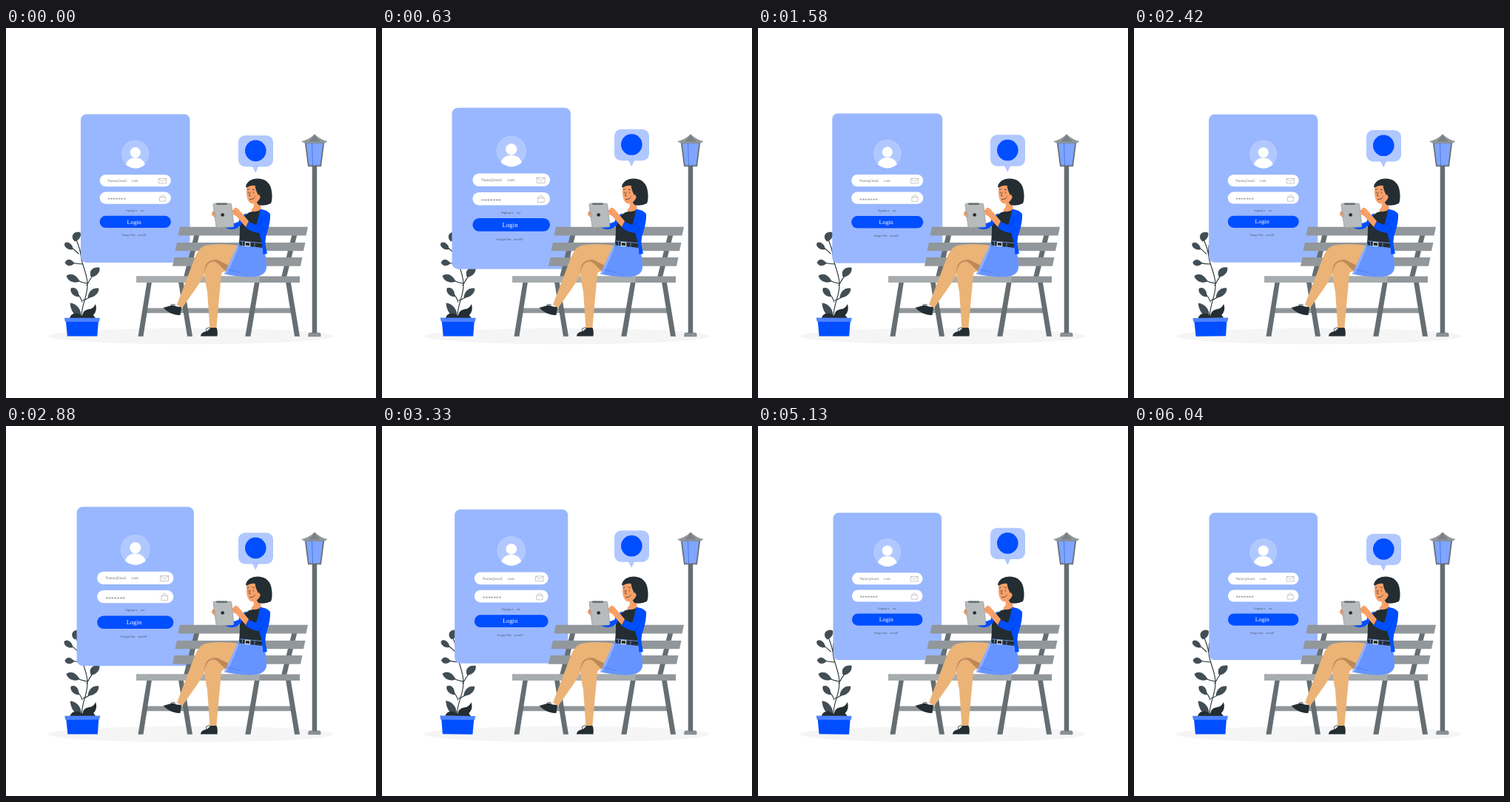
These frames come from a looping animation (500x500 px, 6080 ms). An HTML page:

```html
<!DOCTYPE html>
<html lang="en">
<head>
<meta charset="utf-8">
<title>Login on a bench</title>
<style>
html, body { margin: 0; width: 100%; height: 100%; overflow: hidden; background: #fff; }
svg { display: block; width: 100vw; height: 100vh; }
text { font-family: "Liberation Serif", "Times New Roman", serif; text-rendering: geometricPrecision; }
.small { font-size: 4.2px; fill: #4a5868; }
.blue { fill: #004eff; }
.pale { fill: #b1c8ff; }
.dark { fill: #232d32; }
.steel { fill: #666e72; }
.slat { fill: #91979a; }
.skin { fill: #f8a069; }
.leg { fill: #ebb376; }
.line { fill: none; stroke: #263238; stroke-width: .8; stroke-linecap: round; }
.icon { fill: none; stroke: #a6a6a6; stroke-width: .6; }
</style>
</head>
<body>
<svg viewBox="0 0 500 500">
  <ellipse cx="249.5" cy="416.5" rx="193.5" ry="10.8" fill="#f5f5f5"/>

  <g id="plant">
    <path class="line" style="stroke-width:1.1" d="M102 391C102 372 111 362 110 345C109 329 102 320 101 307C100 298 98 294 94 284M101 307L101.500 294M104 319Q96 319 89 317M109 348Q113 340 119 332M109 345Q101 344 93 339M103 370Q101 363 94 357M104 368Q112 366 118 359M98 305Q92 299 86 295"/>
    <g fill="#424e55" stroke="#2b363c" stroke-width=".7">
      <path d="M93 288C89 285 89 279 93 277C96 275.500 100.500 276 100.500 277.500C101 282 98 287 93 288Z"/>
      <path d="M90 299C83 300 78 295 79.500 291C83 288 90 292 90 299Z"/>
      <path d="M92 318C88 322 82 322 80 317C82 312 88 312 92 318Z"/>
      <path d="M115 336C112 328 117 323 126 324C127 330 122 336 115 336Z"/>
      <path d="M99 342C94 345 84 343 82 335C88 331 95 334 99 342Z"/>
      <path d="M98 363C91 362 87 358 88 352C94 350 98 354 98 363Z"/>
      <path d="M111 364C112 356 117 351 125 352C125 359 119 364 111 364Z"/>
      <path d="M101 391C93 390 88 382 87 372C96 373 102 381 101 391Z"/>
    </g>
    <path class="dark" d="M86 392Q89 384 98 386Q101 388 103 389Q104 381 112 380Q118 380 121 373Q124 382 118 388L121 392Z"/>
    <path class="blue" d="M81 396H125L123.5 416.5H83Z"/>
    <path fill="#4d83ff" d="M79 391.7H127L126 397H80Z"/>
  </g>

  <g id="panel">
    <rect x="101.5" y="117.2" width="146.5" height="199" rx="7.5" fill="#99b7ff"/>
    <circle class="pale" cx="174.8" cy="170.5" r="19.3" stroke="#86a9ff" stroke-width=".5"/>
    <circle cx="174.8" cy="168.5" r="7" fill="#fff"/>
    <path d="M162 185C164.500 172.500 185 172.500 187.600 185Q175 195 162 185Z" fill="#fff"/>
    <g fill="#fff">
      <rect x="127" y="198.300" width="95.500" height="16" rx="8"/>
      <rect x="127" y="221.500" width="95.500" height="16" rx="8"/>
    </g>
    <rect class="blue" x="127" y="253.500" width="95.500" height="16.200" rx="8.100"/>
    <path class="icon" d="M206.200 203.500H216.200V210H206.200ZL211.200 207.500L216.200 203.500"/>
    <path class="icon" d="M207.300 228.500H215.300V234H207.300ZM208.900 228.500V227.500Q211.300 223.500 213.700 227.500V228.500"/>
    <text x="137.500" y="208" font-size="5" fill="#777">Name@mail.<tspan x="170">com</tspan></text>
    <text x="137.500" y="234.300" font-size="7" fill="#777">*******</text>
    <text class="small" x="162.200" y="247.700">Signup n<tspan x="181.400">ow</tspan></text>
    <text x="173.200" y="264.200" font-size="8" fill="#fff" text-anchor="middle">Login</text>
    <text class="small" x="156.700" y="280.800">Forgot Pas<tspan x="177.800">sword?</tspan></text>
  </g>

  <g id="bench">
    <path class="steel" d="M254.500 279H261.500L247 337H240ZM386.500 279H393.500L379 337H372Z"/>
    <path class="slat" d="M190 378.500H388V385.200H190Z"/>
    <path class="steel" d="M190.500 343H197L185.500 416.700H178.500ZM233 343H239.700L252 416.700H245ZM336 343H342.700L330.500 416.700H323.300ZM378 343H384.700L397 416.700H390Z"/>
    <path class="slat" d="M235 268.800H408L405.500 280.500H232.500ZM231 290H404.500L402 301.300H228.500ZM227.500 310H400.500L398 321.700H225ZM176.300 335.500H397V344H176.300Z"/>
    <path fill="#a7acae" d="M176.300 335.500H342.500V344H176.300Z"/>
  </g>

  <g id="lamp">
    <path class="steel" d="M413.700 186H420.200V413H413.700Z"/>
    <path fill="#8c9295" stroke="#666e72" stroke-width=".6" d="M408.700 416.700V414Q409 412 411 412H423Q425 412 425 414V416.700Z"/>
    <path fill="#7fa5ff" stroke="#666e72" stroke-width="1.700" d="M404.700 155H429.300L425.200 186.300H408.800Z"/>
    <path fill="none" stroke="#3f6ee0" stroke-width=".8" d="M413.500 155L414.500 186"/>
    <path fill="#92989b" d="M399 153Q409 151 417 143.500Q425 151 434.500 153L431 155.500H403Z"/>
    <path fill="#7c8387" d="M417 143.500Q420 149 425 153.500H409Q414 149 417 143.500Z"/>
  </g>

  <g id="bubble">
    <rect class="pale" x="314" y="145.700" width="47" height="42.300" rx="9"/>
    <path class="pale" d="M333 187H341L337.300 195.500Z" stroke="#9bb9ff" stroke-width=".4"/>
    <circle class="blue" cx="337.300" cy="166.400" r="14.300"/>
  </g>

  <g id="woman">
    <path class="leg" d="M318 322L299 329C291 328 291 332 290.500 338L284.200 407H275.500L272 356C269 342 267 330 269 322C272 312 284 309 300 316Z"/>
    <path class="leg" d="M314 294C302 292 276 291 267 295C261 298 257 305 253 316L231 374L238.500 378C247 365 264 343 268 333C267 318 275 312 286 313.500L303 325Z"/>
    <path fill="#bd8958" d="M268 333C267 318 275 312 286 313.500L303 322L299 329C291 326 287 315 280 315.500C273 316 269 323 268 333Z"/>
    <path class="dark" d="M212.500 378L225 374.500Q231 377 237 377L235.500 388Q225 388 217 382ZM263 415.800Q264 411 272 409.500L277 405H284.500Q286.500 410 285.500 416.500H263Z"/>
    <path class="line" d="M223 376Q223 372 226 374Q229 372 228 376M271 410Q269 404 273 406Q275 402 276 407"/>
    <path fill="#6694ff" d="M314 292L347 295C351 305 352.500 315 352 325C350 333 343 336.500 330 336.500Q311 336 295 332.500Z"/>
    <path fill="#8fb0ff" d="M313.500 292L295 332.500L297.500 333Q303 324 314 297Z"/>
    <path fill="none" stroke="#3b70f0" stroke-width=".6" d="M299 326L316 330.500"/>

    <path class="dark" d="M329 249L346 245L349 292L315 291Q317 266 315 258Z"/>
    <path class="dark" d="M316 287.500L347 290.500L346.500 297L315.500 293.500Z"/>
    <path fill="none" stroke="#8fb0ff" stroke-width=".7" d="M316 287.800L347 290.800M319.500 288V293.800M336 290V295.500"/>
    <path fill="none" stroke="#fff" stroke-width="1" d="M323.500 289.300L330 290L329.400 295L323 294.300Z"/>
    <path class="blue" d="M325 250Q318 253 314 262L302 266L295 269Q302 274 311 271L317 267Z"/>
    <path class="skin" d="M334 232H343L345 245Q338 250 331 247L335 241Z"/>
    <path class="blue" d="M343 245Q352 245 357 251Q357.500 262 353 276Q348 287 353 305L347.500 306Q347 292 342 277Q334 277 324 270L328 262L338 266Q341 259 343 245Z"/>
    <path fill="none" stroke="#003bc2" stroke-width=".7" d="M346 256Q345 264 341 268M341 277Q346 274 348 269"/>

    <path class="dark" d="M324 214C326 206 334 203 341 203.500C352 204 358 211 359 221Q360.500 231 358 237Q350 241 341 239L332 225Z"/>
    <path class="skin" d="M326 213Q324 222 326 230Q328 237 333 237.500Q339 237 342 232Q345 228 342.500 226L337 211Z"/>
    <path class="dark" d="M324.500 216Q330 206 338 207Q347 214 345 227Q342.500 223 341 226Q338 221 336.500 213Q331 212 324.500 216Z"/>
    <path class="line" style="stroke-width:.7" d="M326 218.500L328.500 217.800M333 218L336 219M327.500 222V223M334.500 222V223.200M330 222L328.500 226.500L330.500 227M329.500 231.500Q333 232.500 336 229.500"/>
    <path fill="#f17552" opacity=".5" d="M335 227H338.500Q338 229.500 335 229Z"/>

    <path class="skin" d="M279 248Q284 245 285 249L287 257Q282 257 279.500 254Q276.500 252 279 248Z"/>
    <path fill="#b8bbbc" stroke="#858b8e" stroke-width=".6" d="M282 237H303Q304.500 237 304.800 238.500L308 267.500Q308 269 306 269L286 270Q284.500 270 284 268.500L280 239Q280 237.200 282 237Z"/>
    <path class="steel" d="M284 236.500H298.500L299 239H284.500Z"/>
    <circle class="dark" cx="292.700" cy="252.500" r="2.300"/>
    <path class="skin" d="M306 247L309 243Q312 242 316 247L328 261L324 269L311 254L306.500 252Z"/>
    <path fill="none" stroke="#c96d45" stroke-width=".5" d="M306 247L311 249M280 250L284 251"/>
  </g>
</svg>
<script>
const LOOP = 6080, START = 40, RATE = 0.987;
const $ = id => document.getElementById(id);
const lerpKeys = (keys, p) => {
  const i = keys.findIndex(k => k[0] >= p);
  if (i < 1) return keys[0][1];
  const [a, u] = keys[i - 1], [b, v] = keys[i];
  return u + (v - u) * (p - a) / (b - a);
};
const beat = [[0, 1], [.1, 1.1], [.3, 1], [.4, 1], [.5, 1.1], [.6, 1], [1, 1]];
const sway = [[0, 0], [.25, 1], [.75, -1], [1, 0]];
const float = [[0, 0], [.5, -10], [1, 0]];

function draw(now) {
  const t = START + now % LOOP * RATE;
  const slow = Math.min(t / 6000, 1), fast = t % 1500 / 1500;
  $('panel').setAttribute('transform',
    `translate(174.75 216.7) scale(${lerpKeys(beat, slow)}) translate(-174.75 -216.7)`);
  $('plant').setAttribute('transform', `rotate(${lerpKeys(sway, fast)} 103 346)`);
  $('bubble').setAttribute('transform', `translate(0 ${lerpKeys(float, fast)})`);
}
const begin = performance.now();
function tick() {
  draw(performance.now() - begin);
  requestAnimationFrame(tick);
}
tick();
</script>
</body>
</html>
```
